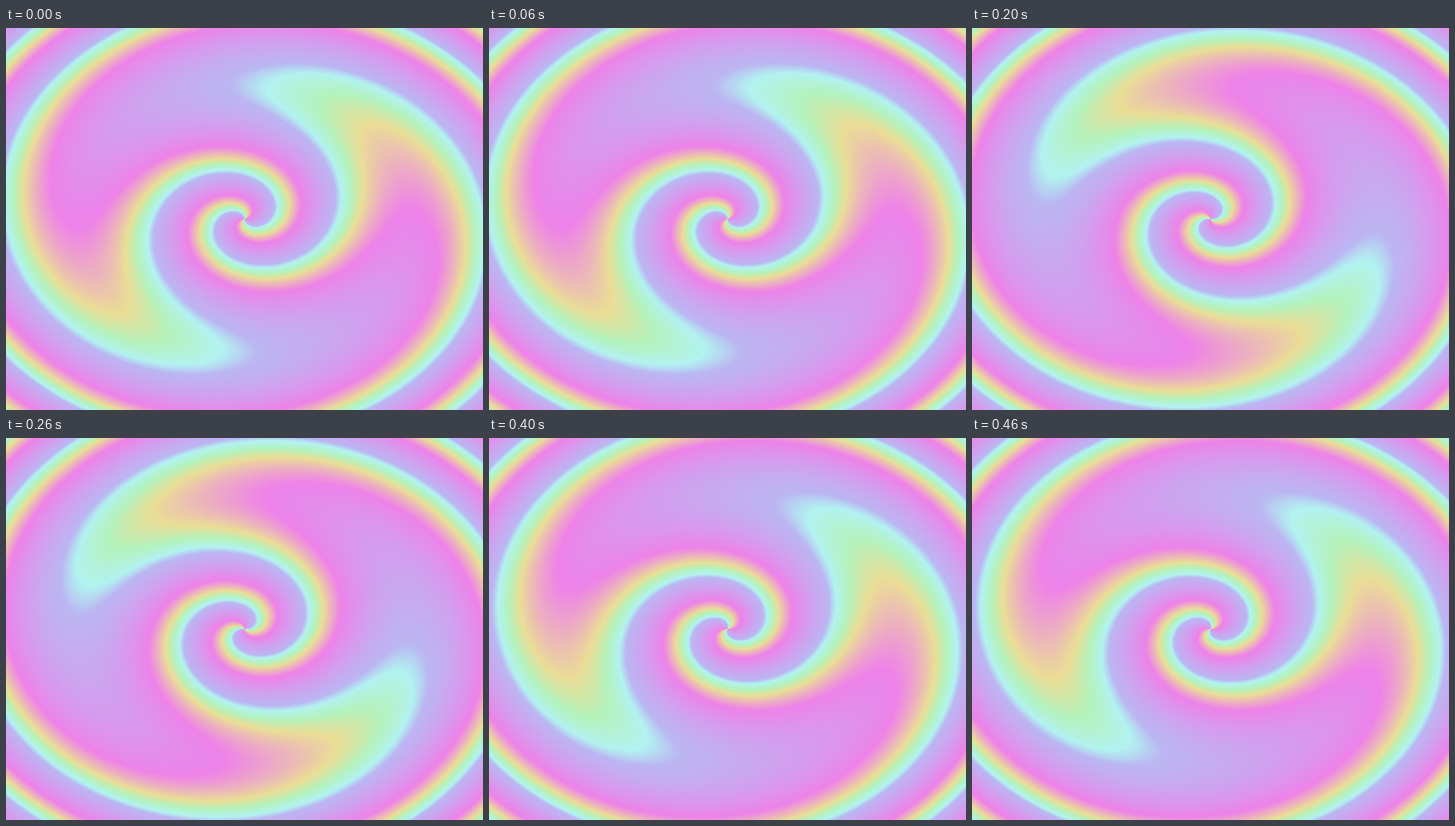
These frames come from a looping animation (500 px wide and 400 px high, 500 ms). An HTML page with a canvas:

```html
<!DOCTYPE html>
<html>
<head>
<meta charset="utf-8">
<style>
html, body { margin: 0; width: 500px; height: 400px; overflow: hidden; }
canvas { display: block; }
</style>
</head>
<body>
<canvas id="stage" width="500" height="400"></canvas>
<script>
const W = 500, H = 400, STEP = 100, STEPS = 5;
const TURN_RADIUS = 0.695;   // where the swirl reverses, relative to the half stage
const SPIN = 39.5 / 180;     // colour cycles per step
const OFFSET = -4 / 180;
const ctx = document.getElementById('stage').getContext('2d', { willReadFrequently: true });

// One colour cycle, painted as a strip and read back
function makePalette() {
  const strip = ctx.createLinearGradient(0, 0, W, 0);
  strip.addColorStop(0, 'rgb(238, 130, 233)');
  strip.addColorStop(0.22, 'rgb(234, 221, 150)');
  strip.addColorStop(0.325, 'rgb(180, 242, 188)');
  strip.addColorStop(0.435, 'rgb(178, 242, 240)');
  strip.addColorStop(0.505, 'rgb(187, 182, 242)');
  strip.addColorStop(1, 'rgb(238, 130, 233)');
  ctx.fillStyle = strip;
  ctx.fillRect(0, 0, W, 1);
  return new Uint32Array(ctx.getImageData(0, 0, W, 1).data.buffer);
}

// Two-armed swirl, in colour cycles
function swirl(x, y) {
  const twist = 2 * Math.sin(Math.hypot(x, y) / TURN_RADIUS * Math.PI / 2);
  return OFFSET - Math.atan2(y, x) / Math.PI - twist;
}

function render(step) {
  const image = ctx.createImageData(W, H);
  const pixels = new Uint32Array(image.data.buffer);
  for (let y = 0; y < H; y++) {
    for (let x = 0; x < W; x++) {
      const phase = swirl((2 * x + 1) / W - 1, (2 * y + 1) / H - 1) - step * SPIN;
      pixels[y * W + x] = palette[Math.floor((phase - Math.floor(phase)) * W) % W];
    }
  }
  return image;
}

const palette = makePalette();
const images = Array.from({ length: STEPS }, (_, step) => render(step));
const start = performance.now();

function draw() {
  const elapsed = Math.max(0, performance.now() - start);
  ctx.putImageData(images[Math.floor(elapsed / STEP) % STEPS], 0, 0);
  requestAnimationFrame(draw);
}
draw();
</script>
</body>
</html>
```
